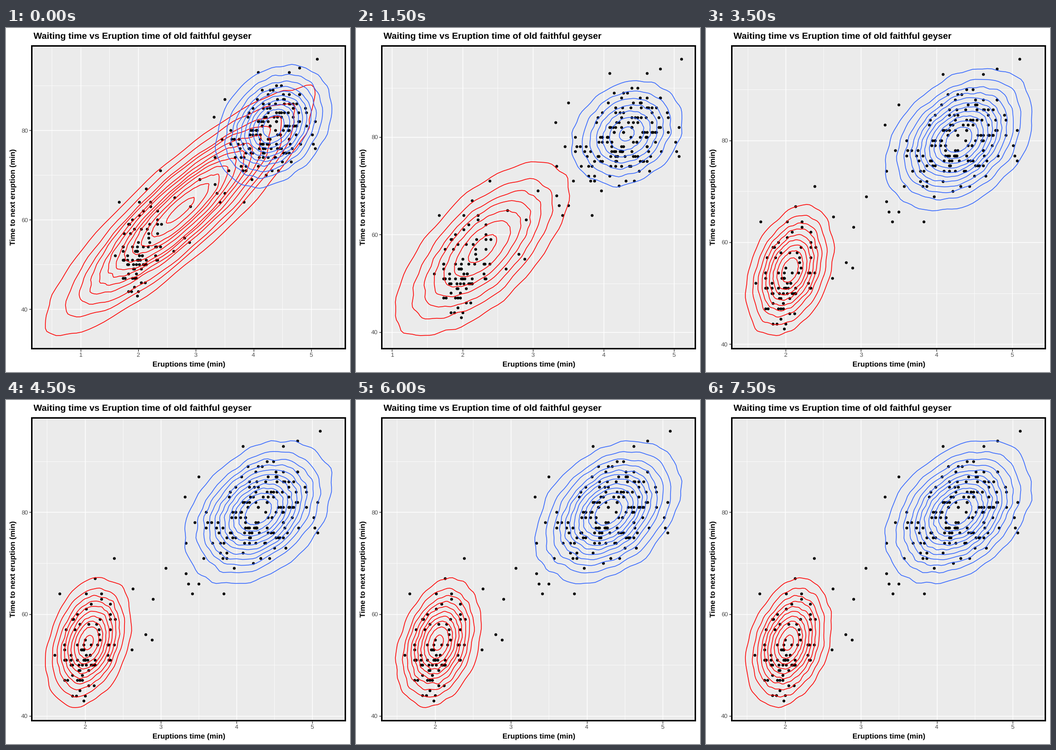
A matplotlib script for the animation above (8000 ms loop, 700 by 700 pixels).

```python
import matplotlib.pyplot as plt
import numpy as np
from matplotlib.animation import FuncAnimation
from matplotlib.collections import LineCollection
from matplotlib.patches import Rectangle
from matplotlib.ticker import MultipleLocator

SIZE, DPI = 700, 100
FRAMES, STEP = 16, 500
LEFT, RIGHT, TOP, BOTTOM = 51, 692.4, 34.5, 654
RED, BLUE = "#FF0000", "#3366FF"
WIDE_SPAN = 54.21  # above this many minutes the y ticks thin out

plt.rcParams["font.family"] = "Liberation Sans"
plt.rcParams["text.hinting"] = "none"

# Isolated eruptions around and between the two clusters
LONERS = [
    (5.1, 96), (4.8, 94), (4.083, 93), (4.617, 93), (3.5, 87), (3.317, 83),
    (3.45, 78), (3.333, 74), (3.567, 71), (3.333, 68), (3.367, 66), (3.5, 66),
    (3.417, 64), (3.833, 64), (3.067, 69), (2.383, 71), (2.133, 67),
    (2.633, 65), (1.667, 64), (2.9, 63), (2.8, 56), (2.883, 55), (2.617, 53),
    (1.6, 52), (1.983, 43), (5.033, 77), (5.067, 76),
]


def cluster(rng, count, mean, sd, rho, reach):
    """Gaussian cloud cut at `reach` deviations, in whole seconds and minutes."""
    u, v = rng.normal(size=(2, 3 * count))
    keep = np.hypot(u, v) < reach
    u, v = u[keep][:count], v[keep][:count]
    x = mean[0] + sd[0] * u
    y = mean[1] + sd[1] * (rho * u + np.sqrt(1 - rho ** 2) * v)
    return np.column_stack([np.round(x * 60) / 60, np.round(y)])


rng = np.random.default_rng(8)
lower = cluster(rng, 80, (2.01, 54), (0.21, 5.6), 0.25, 1.9)
lower[:, 0] = np.maximum(lower[:, 0], 1.733)
upper = cluster(rng, 150, (4.32, 80.2), (0.37, 5.7), 0.3, 2.1)
points = np.vstack([LONERS, lower, upper])


def decay(t, scale, power):
    return np.exp(-(t / scale) ** power)


def settle(start, rest, left):
    start, rest = np.array(start), np.array(rest)
    return rest + (start - rest) * left


def red_fit(t):
    """The broad diagonal component shrinks onto the lower cluster."""
    left = decay(t, 1.7, 1.9)
    mean = settle((2.73, 62.14), (2.045, 54.4), decay(t, 1.45, 1.55))
    sd = settle((1.044, 12.5), (0.262, 5.9), left)
    return mean, sd, settle(0.88, 0.29, left ** 0.6)


def blue_fit(t):
    """The upper component tightens for a moment, then widens again."""
    left = decay(t, 1.7, 1.9) ** 0.5
    dip = np.exp(-((t - 2) / 0.8) ** 2)
    mean = settle((4.35, 80.9), (4.285, 80.0), left)
    sd = settle((0.464, 6.35), (0.435, 6.3), left) * (1 - 0.2 * dip)
    return mean, sd, settle(0.28, 0.36, left) - 0.15 * dip


def pretty_step(peak):
    """Round a tenth of the peak to 1, 2, 5 or 10 times a power of ten."""
    cell = peak / 10
    base = 10 ** np.floor(np.log10(cell))
    return base * (1, 2, 5, 10)[np.searchsorted((1.4, 2.8, 7), cell / base)]


A = np.linspace(0, 2 * np.pi, 91)


def wobble(rng, amp):
    return sum(amp * rng.normal() / np.sqrt(k) * np.cos(k * A + rng.uniform(0, 6.28))
               for k in range(3, 25))


def unit(v):
    """Scale a closed coordinate track to run from -1 to 1."""
    return 2 * (v - v.min()) / np.ptp(v) - 1


def contours(fit, seed):
    """Slightly rough level lines of a Gaussian density at even heights."""
    mean, sd, rho = fit
    rng = np.random.default_rng(seed)
    peak = 0.96 / (2 * np.pi * sd[0] * sd[1] * np.sqrt(1 - rho ** 2))
    n = peak / pretty_step(peak)
    shared = wobble(rng, 0.009)
    lines = []
    for k in range(1, int(np.ceil(n))):
        r = 1 + shared + wobble(rng, 0.008)
        ring = np.column_stack([unit(r * np.cos(A)),
                                unit(r * np.sin(A + np.arcsin(rho)))])
        lines.append(mean + sd * np.sqrt(2 * np.log(n / k)) * ring)
    return lines


fig = plt.figure(figsize=(SIZE / DPI, SIZE / DPI), dpi=DPI, facecolor="white")
ax = fig.add_axes([LEFT / SIZE, 1 - BOTTOM / SIZE,
                   (RIGHT - LEFT) / SIZE, (BOTTOM - TOP) / SIZE],
                  facecolor="#EBEBEB")
ax.set_axisbelow(True)
ax.spines[:].set_visible(False)
ax.grid(which="major", color="white", lw=1.07)
ax.grid(which="minor", color="white", lw=0.53)
ax.tick_params(which="major", length=2.75, width=1.07, pad=1.76,
               color="#333333", labelcolor="#4D4D4D", labelsize=8.8)
ax.tick_params(which="minor", length=0)
ax.xaxis.set_major_locator(MultipleLocator(1))
ax.xaxis.set_minor_locator(MultipleLocator(0.5))


def label(x, y, text, size, **kw):
    fig.text(x / SIZE, 1 - y / SIZE, text, size=size, weight="bold",
             va="baseline", rotation_mode="anchor", **kw)


label(56, 21, "Waiting time vs Eruption time of old faithful geyser", 13.2)
label((LEFT + RIGHT) / 2, 689.3, "Eruptions time (min)", 11, ha="center")
label(18.5, (TOP + BOTTOM) / 2, "Time to next eruption (min)", 11,
      ha="center", rotation=90)

ax.scatter(*points.T, s=4.2 ** 2, color="black", lw=0, zorder=3)
rings = [LineCollection([], colors=c, lw=1.07, zorder=4) for c in (RED, BLUE)]
for ring in rings:
    ax.add_collection(ring, autolim=False)
ax.add_patch(Rectangle((0, 0), 1, 1, transform=ax.transAxes, fill=False,
                       ec="black", lw=4.27, zorder=6))


def draw(i):
    t = i * STEP / 1000
    sets = [contours(red_fit(t), 2 * i), contours(blue_fit(t), 2 * i + 1)]
    for ring, lines in zip(rings, sets):
        ring.set_segments(lines)

    # Fit the axes to everything drawn, plus five percent
    every = np.vstack([points] + sets[0] + sets[1])
    lo, hi = every.min(axis=0), every.max(axis=0)
    span = hi - lo
    ax.set_xlim(lo[0] - 0.05 * span[0], hi[0] + 0.05 * span[0])
    ax.set_ylim(lo[1] - 0.05 * span[1], hi[1] + 0.05 * span[1])
    gap = 20 if span[1] > WIDE_SPAN else 10
    ax.yaxis.set_major_locator(MultipleLocator(gap))
    ax.yaxis.set_minor_locator(MultipleLocator(gap / 2))
    return rings


anim = FuncAnimation(fig, draw, frames=FRAMES, interval=STEP,
                     repeat=True, repeat_delay=0, blit=False)
plt.show()
```
